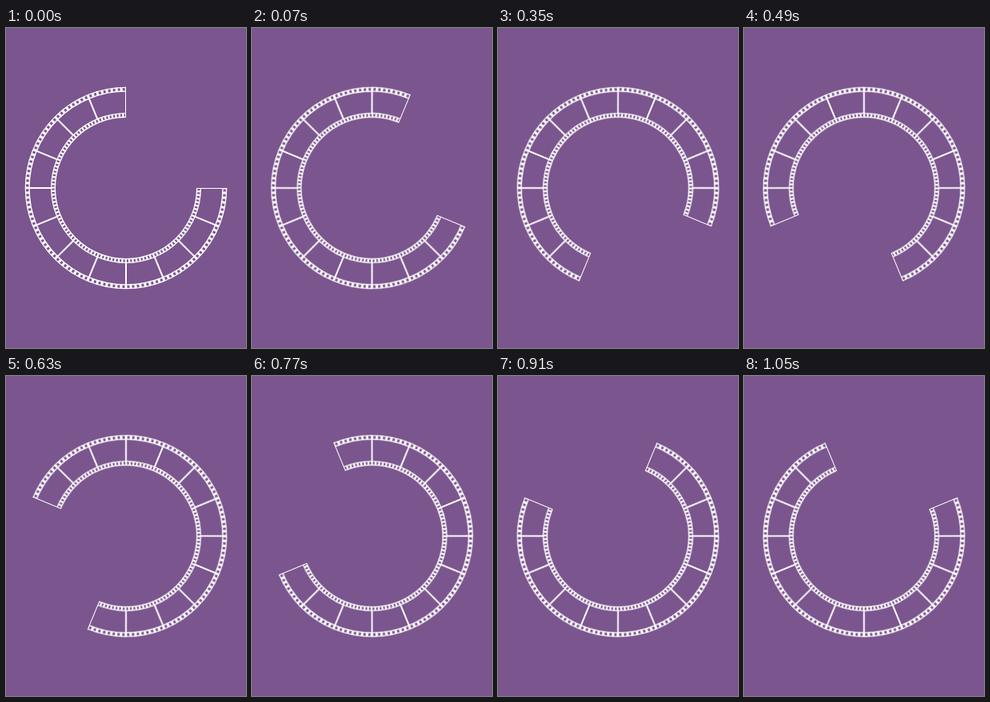
These frames come from a looping animation (300 px wide and 400 px high, 1120 ms). An HTML page:

```html
<!DOCTYPE html>
<html lang="en">
<head>
<meta charset="utf-8">
<title>Film strip loader</title>
<style>
  html, body { margin: 0; width: 100%; height: 100%; overflow: hidden; background: #7b558e; }
  svg { display: block; width: 100vw; height: 100vh; }
  #strip { animation: turn 1120ms steps(16, end) infinite; }
  @keyframes turn {
    from { transform: rotate(0deg); }
    to { transform: rotate(360deg); }
  }
</style>
</head>
<body>
<svg viewBox="-150 -200 300 400">
  <defs>
    <!-- three quarters of the ring, open at the top right -->
    <clipPath id="open"><path d="M0 0V-140H-140V140H140V0Z"/></clipPath>
  </defs>
  <g id="strip"><g id="film" clip-path="url(#open)" fill="none"></g></g>
</svg>
<script>
  const BACK = '#7b558e', WHITE = '#fff';
  const CELLS = 16, HOLES = 8 * CELLS;
  const OUTER = 126.3, INNER = 88, RAIL = 6;
  const film = document.getElementById('film');

  function add(tag, attrs) {
    const el = document.createElementNS('http://www.w3.org/2000/svg', tag);
    for (const key in attrs) el.setAttribute(key, attrs[key]);
    film.append(el);
  }

  // A white rail with evenly spaced holes, each centred in its pitch.
  function rail(r) {
    const pitch = 2 * Math.PI * r / HOLES, hole = pitch * 0.5;
    add('circle', { r, stroke: WHITE, 'stroke-width': RAIL });
    add('circle', {
      r, stroke: BACK, 'stroke-width': 3.4,
      'stroke-dasharray': `${hole} ${pitch - hole}`,
      'stroke-dashoffset': -(pitch - hole) / 2
    });
  }

  for (let i = 0; i < CELLS; i++) {
    add('line', {
      x1: INNER + 1, x2: OUTER - 1, stroke: WHITE, 'stroke-width': 2,
      transform: `rotate(${i * 360 / CELLS})`
    });
  }
  rail(OUTER - RAIL / 2);
  rail(INNER + RAIL / 2);
  // Thin closing edges at both ends of the strip.
  add('path', {
    d: `M${INNER} 0H${OUTER}M0 ${-INNER}V${-OUTER}`, stroke: WHITE, 'stroke-width': 2
  });
</script>
</body>
</html>
```
